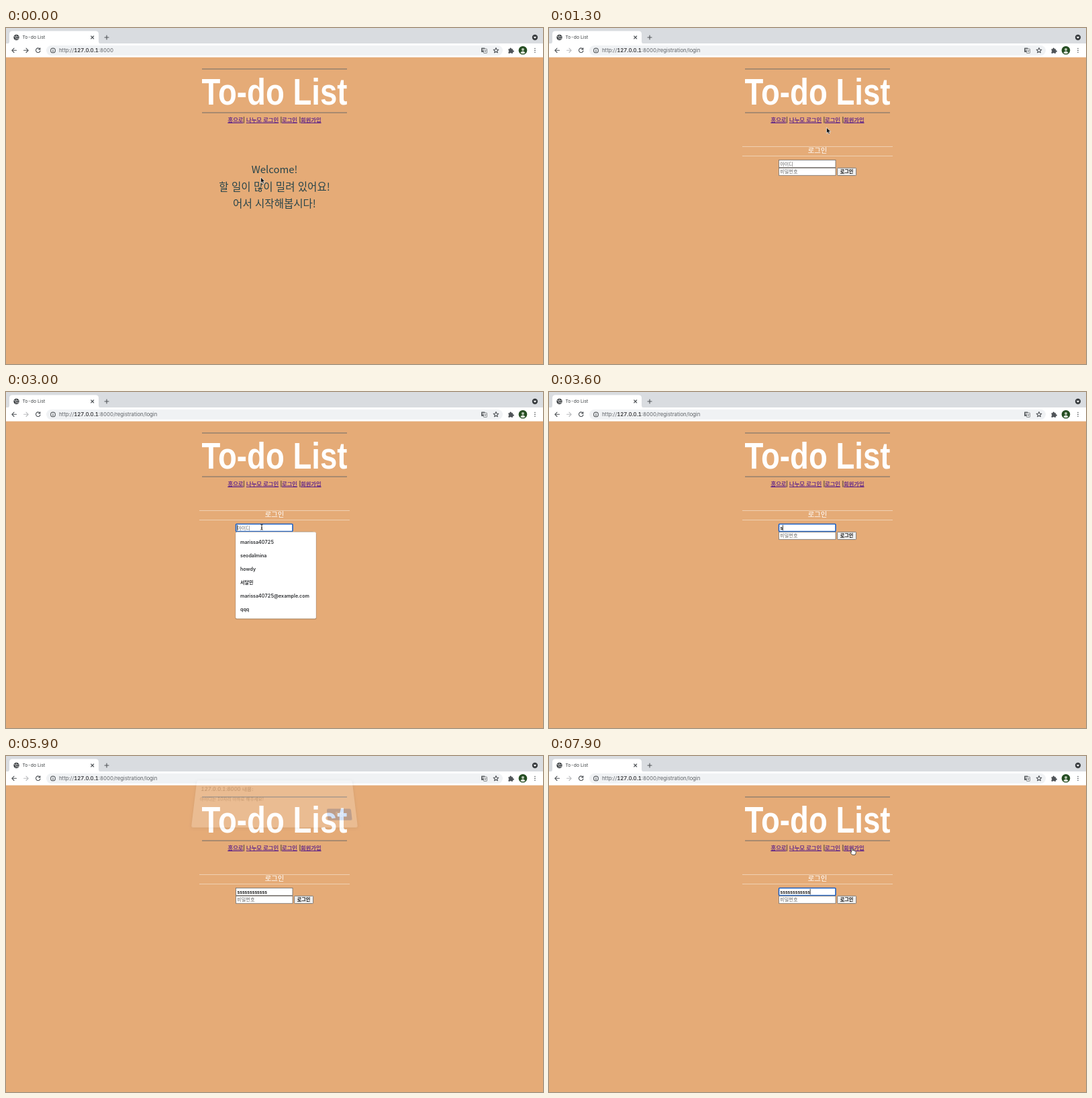
Animation, 800 px wide and 500 px high, one loop 8 s. Source, as an HTML page:

```html
<!DOCTYPE html>
<html lang="ko">
<head>
<meta charset="utf-8">
<title>To-do List</title>
<style>
html, body { margin: 0; width: 100%; height: 100%; overflow: hidden; background: #e5ab77; }
#stage { position: relative; width: 800px; height: 500px; overflow: hidden; font-variant-numeric: tabular-nums;
  font-family: Inter, "Noto Sans CJK KR", "Noto Sans CJK", sans-serif; }
svg { position: absolute; left: 0; top: 0; display: block; }
text { white-space: pre; }
.ko { font-family: "Noto Sans CJK KR", "Noto Sans CJK", sans-serif; }
.mid { text-anchor: middle; }
.line { fill: none; stroke: #505458; stroke-width: 1.1; stroke-linecap: round; stroke-linejoin: round; }
#dialog { position: absolute; left: 276px; top: 36px; width: 248px; height: 76px; background: #fff;
  border-radius: 3px; box-shadow: 0 1px 4px rgba(0,0,0,.35); transform-origin: 50% 100%; }
#dialog div { position: absolute; left: 8px; white-space: nowrap; }
#dialog .title { top: 9px; font-size: 8.3px; line-height: 12px; color: #202124; }
#dialog .note { top: 26px; font-size: 6.9px; line-height: 11px; color: #3c4043; }
#dialog .ok { left: auto; right: 7px; top: 47px; width: 37px; height: 18px; line-height: 18px; border-radius: 2.5px;
  background: #1a66d8; color: #fff; font-size: 6.7px; text-align: center; }
</style>
</head>
<body>
<div id="stage">
<svg width="800" height="500" viewBox="0 0 800 500">
  <rect width="800" height="500" fill="#e5ab77"/>

  <g id="chrome">
    <rect width="800" height="25" fill="#d9dce0"/>
    <rect y="23" width="800" height="20.600" fill="#fff"/>
    <path d="M2 23.500Q5 23 5 20V9Q5 4.500 9.500 4.500H133.500Q138 4.500 138 9V20Q138 23 141 23.500Z" fill="#fff"/>
    <circle cx="15.500" cy="14" r="4.200" fill="#3c4043"/>
    <path d="M12.200 12.500l2.500 1.200.6 2-1.200 1.400M15.500 10.800l-.6 1.400 2 1 1.800-.4M16.500 17l.7-1.500 1.500.2" fill="none" stroke="#fff" stroke-width=".8"/>
    <text x="24.500" y="16.400" font-size="6.800" fill="#3c4043">To-do List</text>
    <path class="line" d="M126.700 12l4 4m0-4l-4 4M147 14h6m-3-3v6"/>
    <circle cx="788" cy="14" r="4.200" fill="#3c4043"/>
    <path d="M785.800 13h4.400l-2.200 2.700z" fill="#fff"/>

    <path class="line" d="M15.500 33.300H9m3-3.200l-3.200 3.200 3.200 3.200"/>
    <path class="line" id="fwd" d="M26.500 33.300H33m-3-3.200l3.200 3.200-3.200 3.200"/>
    <path class="line" d="M50.400 31.200a3.300 3.300 0 1 0 .6 2.800M50.900 29.700v2.200h-2.200"/>
    <rect x="60" y="26" width="680" height="15" rx="7.500" fill="#f0f2f4"/>
    <circle class="line" cx="70" cy="33.400" r="3.400"/>
    <path class="line" d="M70 33.200v2M70 31.500v.1"/>
    <text x="79" y="36.200" font-size="7.800" fill="#5f6368">http://<tspan fill="#202124" stroke="#202124" stroke-width=".15">127.0.0.1</tspan>:8000<tspan id="path"></tspan></text>

    <rect x="708" y="29.500" width="5.500" height="6.500" rx=".7" fill="#63676b"/>
    <rect x="711.500" y="31" width="5" height="6.500" rx=".7" fill="#f0f2f4" stroke="#63676b" stroke-width=".7"/>
    <path d="M709.500 32h2.500M710.700 31v3" stroke="#fff" stroke-width=".7"/>
    <path d="M712.700 33.300h2.700m-.4 0q-.5 1.700-2 2.500m.2-1.600l1.900 1.600" stroke="#63676b" stroke-width=".6" fill="none"/>
    <path class="line" id="star"/>
    <path d="M748.500 31.200h2a1.300 1.300 0 1 1 2.500 0h2v2.200a1.300 1.300 0 1 1 0 2.300v2h-2.200a1.200 1.200 0 0 0-2.200 0h-2.100v-2.200a1.200 1.200 0 0 0 0-2.200z" fill="#505458"/>
    <circle cx="770" cy="33.200" r="6.300" fill="#254d22"/>
    <circle cx="770" cy="32" r="2" fill="#b9c7b4"/>
    <path d="M766.300 36.700q3.700-4.600 7.400 0a5 5 0 0 1-7.400 0z" fill="#dfe5dc"/>
    <path d="M788 30.500v.01M788 33.400v.01M788 36.300v.01" stroke="#505458" stroke-width="1.600" stroke-linecap="round"/>
  </g>

  <path d="M292 61H508M292 126H508" stroke="#6c6a68" stroke-width="1"/>
  <text class="mid" transform="translate(400 114.300) scale(.82 1)" font-family="'Liberation Sans', Arial, sans-serif" font-weight="700" font-size="55.600" fill="#fff">To-do List</text>
  <g id="nav" class="ko" font-size="8.300" fill="#551a8b" stroke="#551a8b" stroke-width=".2"></g>

  <g id="home" class="ko mid" fill="#27444a">
    <text x="400" y="216" font-size="14.900">Welcome!</text>
    <text x="400" y="241.600" font-size="15.550">할 일이 많이 밀려 있어요!</text>
    <text x="400" y="267.200" font-size="15.550">어서 시작해봅시다!</text>
  </g>

  <g id="login" class="ko" font-size="7.100">
    <path d="M288 176.500H512M288 190.500H512" stroke="#efd0b2" stroke-width="1"/>
    <text class="mid" x="400" y="186.400" font-size="10.300" fill="#fff">로그인</text>
    <rect id="field" x="342.500" y="196.500" width="84.500" height="11" fill="#fff"/>
    <rect x="342.500" y="208.300" width="84.500" height="11" fill="#fff" stroke="#767676" stroke-width=".8"/>
    <text id="hint" x="344.300" y="204.600" fill="#666">아이디</text>
    <text x="344.300" y="216.300" fill="#666">비밀번호</text>
    <text id="typed" x="344.500" y="204.600" font-family="'Liberation Sans', Arial, sans-serif" font-weight="700" font-size="6.670" fill="#111"></text>
    <rect id="caret" y="197.800" width=".8" height="8.400" fill="#111"/>
    <rect x="429.600" y="208.300" width="28" height="11.200" rx="1" fill="#efefef" stroke="#666" stroke-width=".8"/>
    <text class="mid" x="443.600" y="216.400" font-weight="700" fill="#111">로그인</text>
  </g>

  <g id="list" font-size="7.100" font-weight="600" fill="#2c2e31">
    <rect x="341.500" y="209" width="121" height="129.500" rx="2.500" fill="#000" opacity=".2"/>
    <rect x="342" y="208.300" width="120" height="129" rx="2" fill="#fff" stroke="#b5a493" stroke-width=".4"/>
  </g>

  <g id="status">
    <path d="M-1 501V489H106.500Q109.500 489 109.500 492V501Z" fill="#dde0e4" stroke="#a2988f" stroke-width=".8"/>
    <text x="2.800" y="496.900" font-size="6.600" fill="#303336">127.0.0.1:8000/registration/login</text>
  </g>
</svg>

<div id="dialog">
  <div class="title">127.0.0.1:8000 내용:</div>
  <div class="note">아이디는 10자리 이하로 해주세요!</div>
  <div class="ok">확인</div>
</div>

<svg width="800" height="500" viewBox="0 0 800 500">
  <g id="arrow"><path d="M0 0V8.600L2 6.800 3.400 9.800 5 9.100 3.700 6.200H6.300Z" fill="#111" stroke="#fff" stroke-width=".7"/></g>
  <g id="hand"><path d="M0 .8Q.9-.6 1.800.8V3.500Q3-.1 3.500 3.600 4.700 2.700 5.100 4 6.500 3.400 6.700 5V7L5.600 9.500H1.200L-1.600 6.300Q-1.500 4.700 0 6Z" fill="#fff" stroke="#222" stroke-width=".75" stroke-linejoin="round"/></g>
  <g id="beam"><path d="M-1.700-4Q0-4 0-3 0-4 1.700-4M0-3V3M-1.700 4Q0 4 0 3 0 4 1.700 4M-1 1.200H1" fill="none" stroke="#111" stroke-width=".9"/></g>
</svg>
</div>

<script>
const $ = id => document.getElementById(id);
const LOOP = 8000, STEP = 100, LETTER = 3.71;
const clamp = v => Math.min(1, Math.max(0, v));
const ramp = (t, a, b) => clamp((t - a) / (b - a));
const ease = k => k * k * (3 - 2 * k);
const within = (t, a, b) => t >= a && t < b;
const show = (id, on) => { $(id).style.display = on ? '' : 'none'; };

function addText(parent, x, y, str, attrs = {}) {
  const el = document.createElementNS('http://www.w3.org/2000/svg', 'text');
  for (const [k, v] of Object.entries({ x, y, ...attrs })) el.setAttribute(k, v);
  el.textContent = str;
  $(parent).append(el);
}

const links = [[330.5, '홈으로'], [358, '나누모 로그인'], [411, '로그인'], [439, '회원가입']];
for (const [x, label] of links) addText('nav', x, 139.8, label, { 'text-decoration': 'underline' });
for (const x of [353.5, 408.7, 436.7]) addText('nav', x, 139.4, '|', { fill: '#222', stroke: '#222' });

['marissa40725', 'seodalmina', 'howdy', '서달민', 'marissa40725@example.com', 'qqq']
  .forEach((name, i) => addText('list', 349, 225.6 + i * 20, name));

const starPoints = Array.from({ length: 10 }, (_, i) => {
  const r = i % 2 ? 1.8 : 4, a = i * Math.PI / 5;
  return (730 + r * Math.sin(a)).toFixed(2) + ' ' + (33.5 - r * Math.cos(a)).toFixed(2);
});
$('star').setAttribute('d', 'M' + starPoints.join('L') + 'Z');

// Pointer stops: time, x, y
const stops = [[0, 379.5, 222], [100, 379.5, 222], [800, 421.5, 135], [1100, 421.5, 135],
  [1800, 381, 201], [7000, 381, 201], [7700, 454, 139], [7800, 454, 139], [7900, 450.5, 137.5]];

function pointer(t) {
  let i = 0;
  while (i < stops.length - 2 && t >= stops[i + 1][0]) i++;
  const [a, x0, y0] = stops[i], [b, x1, y1] = stops[i + 1];
  const k = ease(ramp(t, a, b));
  return [x0 + (x1 - x0) * k, y0 + (y1 - y0) * k];
}

function drawPointer(t) {
  const [x, y] = pointer(t);
  const hidden = within(t, 3500, 7000);
  const overLink = within(y, 131, 142) && links.some(([lx, s]) => within(x, lx, lx + s.length * 7.6));
  const overField = t >= 1100 && within(x, 342, 427) && within(y, 196, 220);
  const kind = overLink ? 'hand' : overField ? 'beam' : 'arrow';
  for (const id of ['arrow', 'hand', 'beam']) show(id, !hidden && id === kind);
  $(kind).setAttribute('transform', `translate(${x} ${y})`);
}

function typedCount(t) {
  if (t < 3500) return 0;
  return t < 5100 ? Math.floor((t - 3500) / 200) + 1 : Math.min(12, 9 + Math.floor((t - 5100) / 100));
}

function caretOn(t) {
  const blink = start => Math.floor((t - start) / 500) % 2 === 0;
  if (within(t, 2000, 3500)) return blink(2000);
  return within(t, 3500, 5900) || (t >= 6700 && blink(6700));
}

function drawForm(t) {
  const n = typedCount(t), focus = within(t, 2000, 5900) || t >= 6600;
  $('field').setAttribute('stroke', focus ? '#1b5fc4' : '#6b6b6b');
  $('field').setAttribute('stroke-width', focus ? 1.6 : .8);
  $('field').setAttribute('rx', focus ? 1 : 0);
  $('typed').textContent = 's'.repeat(n);
  show('hint', !n);
  show('caret', caretOn(t));
  $('caret').setAttribute('x', 344.2 + n * LETTER);
  show('list', within(t, 2100, 3600));
}

function drawDialog(t) {
  const k = t < 6300 ? ramp(t, 5850, 6100) : 1 - ramp(t, 6390, 6590);
  const style = $('dialog').style;
  show('dialog', k > 0);
  style.opacity = k;
  style.transform = `translateY(${-7 * (1 - k)}px) perspective(150px) rotateX(${10.4 * (1 - k)}deg)`;
}

function draw(t) {
  const login = t >= 1100;
  show('home', !login);
  show('login', login);
  $('path').textContent = login ? '/registration/login' : '';
  $('fwd').style.stroke = login ? '#babcbe' : '#505458';
  $('status').style.opacity = ramp(t, 600, 800) * (1 - ramp(t, 1100, 1300));
  drawForm(t);
  drawDialog(t);
  drawPointer(t);
}

const start = performance.now();
function tick() {
  const t = (performance.now() - start) % LOOP;
  draw(Math.floor(t / STEP) * STEP);
  requestAnimationFrame(tick);
}
tick();
</script>
</body>
</html>
```
